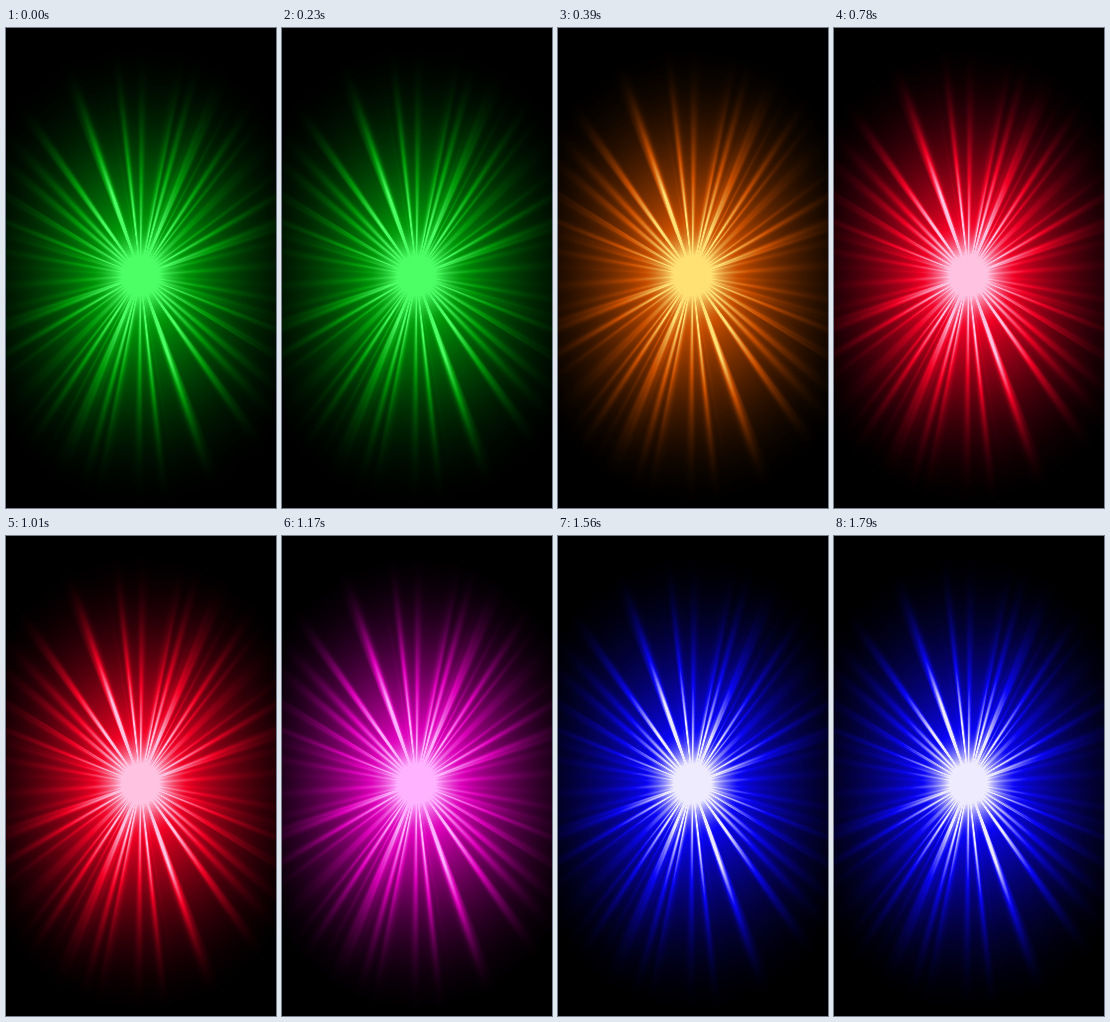
Write an HTML page with a canvas that moves like this. It is 270 px wide and 480 px high and loops after 1.95 s.

```html
<!DOCTYPE html>
<html lang="en">
<head>
<meta charset="utf-8">
<title>Starburst</title>
<style>
  html, body { margin: 0; height: 100%; overflow: hidden; background: #000; }
  canvas { display: block; width: 100vw; height: 100vh; }
</style>
</head>
<body>
<canvas id="stage" width="270" height="480"></canvas>
<script>
const W = 270, H = 480, CX = 134, CY = 247;
const HOLD = 390;
const BINS_PER_DEGREE = 10, BINS = 180 * BINS_PER_DEGREE;
const ctx = document.getElementById('stage').getContext('2d');

// Light runs from black through the ray colour to the core colour.
const themes = [
  { ray: [0, 150, 8], core: [75, 255, 100] },
  { ray: [200, 78, 0], core: [255, 225, 115] },
  { ray: [240, 0, 36], core: [255, 195, 225] },
  { ray: [220, 0, 185], core: [255, 178, 255] },
  { ray: [10, 5, 245], core: [238, 235, 255] }
];

let seed = 17;
function random() {
  seed = (seed * 16807) % 2147483647;
  return seed / 2147483647;
}

// Ray strength by bearing, clockwise from up; every ray runs both ways.
const profile = new Float32Array(BINS).fill(.8);
function addRay(bearing, width, strength) {
  const reach = Math.ceil(width * 3 * BINS_PER_DEGREE);
  const middle = Math.round(bearing * BINS_PER_DEGREE);
  for (let i = -reach; i <= reach; i++) {
    const falloff = Math.exp(-((i / BINS_PER_DEGREE / width) ** 2));
    profile[(middle + i + BINS) % BINS] += strength * falloff;
  }
}
const brightBearings = [-19, 33, 15, -35, -6, 60, 120];
brightBearings.forEach((bearing, i) => addRay(bearing, 1.3, .95 - .08 * i));
for (let i = 0; i < 60; i++) {
  addRay(random() * 180, .6 + random() * 1.4, random() * .5);
}
const meanStrength = profile.reduce((sum, value) => sum + value) / BINS;

function brightness(x, y) {
  const dx = x - CX, dy = y - CY;
  const r = Math.hypot(dx, dy);
  const fade = Math.max(0, 1 - Math.hypot(dx / .8, dy) / 235) ** 1.9;
  const halfTurns = Math.atan2(dx, -dy) / Math.PI + 1;
  const ray = profile[Math.floor(halfTurns * BINS) % BINS];
  const contrast = Math.min(1, r / 45);
  const strength = meanStrength + (ray - meanStrength) * contrast;
  const core = .35 * Math.exp(-((r / 28) ** 2));
  return Math.min(1, core + fade * strength);
}

const light = Float32Array.from({ length: W * H },
  (_, i) => brightness(i % W, Math.floor(i / W)));

function paint({ ray, core }) {
  const image = ctx.createImageData(W, H);
  light.forEach((value, i) => {
    const rise = Math.min(1, value * 2);
    const glow = Math.max(0, value * 2 - 1);
    for (let c = 0; c < 3; c++) {
      image.data[i * 4 + c] = ray[c] * rise + (core[c] - ray[c]) * glow;
    }
    image.data[i * 4 + 3] = 255;
  });
  return image;
}

const images = themes.map(paint);
const start = performance.now();

function draw() {
  const elapsed = performance.now() - start;
  ctx.putImageData(images[Math.floor(elapsed / HOLD) % images.length], 0, 0);
  requestAnimationFrame(draw);
}
draw();
</script>
</body>
</html>
```
